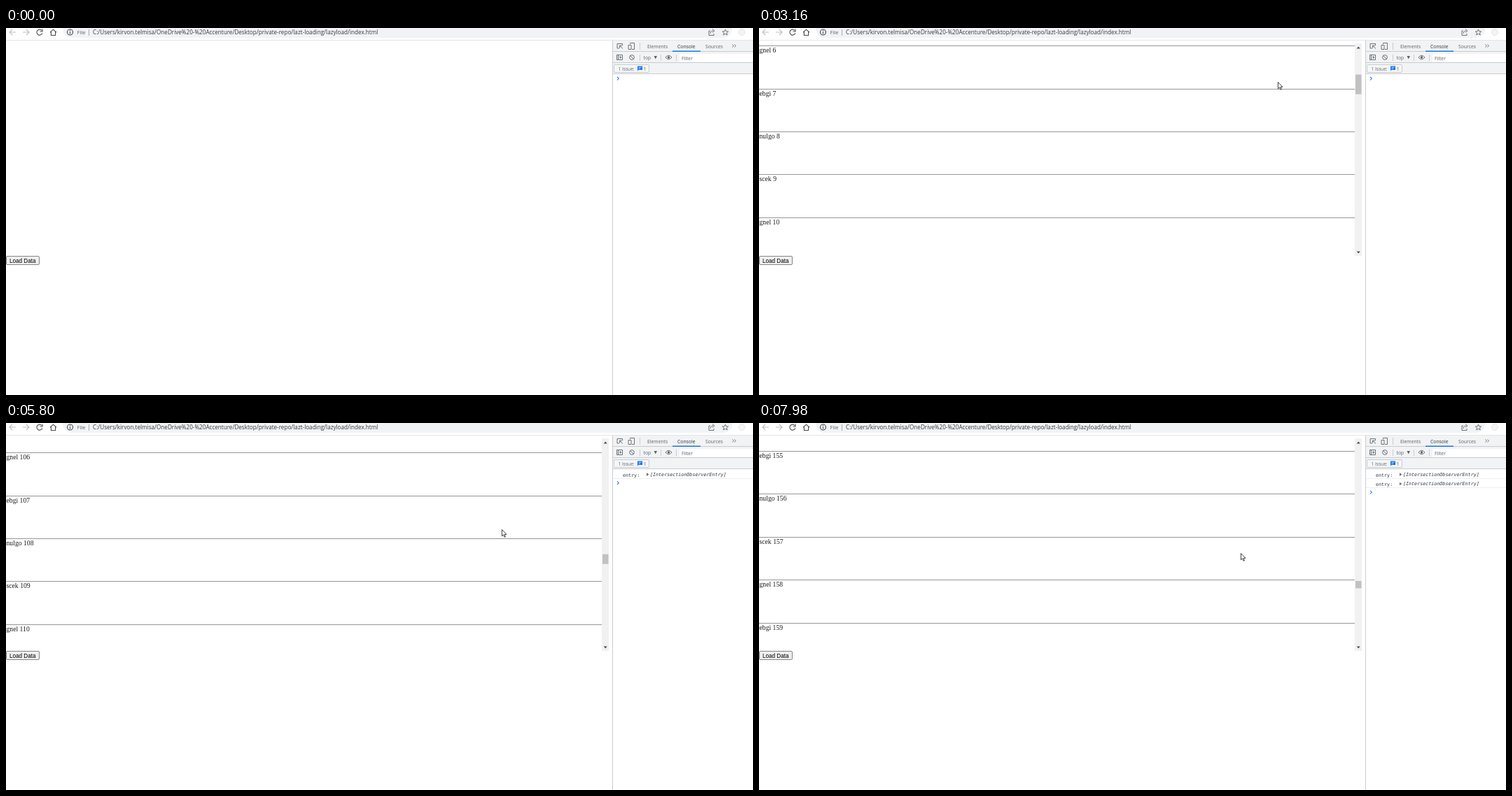
These frames come from a looping animation (1067 by 525 pixels, 8000 ms). An HTML page:

```html
<!DOCTYPE html>
<html lang="en">
<head>
<meta charset="utf-8">
<title>Lazy loading list</title>
<style>
  html, body { margin: 0; width: 100%; height: 100%; overflow: hidden; background: #fff; }
  svg { display: block; }
  text { white-space: pre; }
  .ui { font: 6.8px "Open Sans", "Noto Sans", sans-serif; fill: #5f6368; }
  .url { font-size: 8.15px; fill: #35383c; }
  .dark { fill: #303134; }
  .serif { font: 9.7px "Liberation Serif", serif; fill: #1c1c1c; }
  .mono { font: 6.7px "DejaVu Sans Mono", monospace; fill: #303942; }
  .italic { font-style: italic; }
  .icon { fill: none; stroke: #5f6368; stroke-width: .9; }
  .nav { stroke: #45494d; stroke-width: 1.1; }
  .off { stroke: #bcbfc2; }
  .rule { stroke: #cacdd1; shape-rendering: crispEdges; }
  .crisp { shape-rendering: crispEdges; }
</style>
</head>
<body>
<svg width="1067" height="525" viewBox="0 0 1067 525">
  <defs>
    <clipPath id="view"><rect y="22" width="851" height="304"/></clipPath>
  </defs>

  <!-- address bar -->
  <rect x="81" y="-13" width="956" height="27" rx="13" fill="#f1f3f4"/>
  <path class="rule" d="M0 17.5H1067" style="stroke:#e3e5e8"/>
  <path class="icon nav off" d="M14 6H5M9 2 5 6l4 4M24 6h9M29 2l4 4-4 4"/>
  <path class="icon nav" d="M51 3.5a4 4 0 1 0 .8 3.8M52 1.5V5h-3.5M63 6.2l4.5-4 4.5 4M64.4 5.5v5h6.2v-5"/>
  <circle class="icon nav" cx="91.5" cy="6" r="4"/>
  <path class="icon nav" d="M91.5 5.5v3M91.5 3.3v1.2"/>
  <text class="ui" x="101.5" y="9" style="font-size:7.6px">File</text>
  <path class="rule" d="M118.5 2v9" style="stroke:#a9acb0"/>
  <text class="ui url" x="124" y="9">C:/Users/kirvon.telmisa/OneDrive%20-%20Accenture/Desktop/private-repo/lazt-loading/lazyload/index.html</text>
  <path class="icon" d="M1006 4h-2v6.5h7V8M1006 8c.3-3 2-4 4-4M1009 1.5l3 2.5-3 2.5"/>
  <path class="icon" d="M1027.5 2l1.2 2.8 3 .2-2.3 2 .8 3-2.7-1.7-2.7 1.7.8-3-2.3-2 3-.2z"/>
  <circle cx="1051" cy="6" r="4.5" fill="#f3f4f5" stroke="#d9dbdd" stroke-width=".7"/>

  <!-- developer panel -->
  <rect x="867" y="18" width="200" height="48" fill="#f1f3f4"/>
  <path class="rule" d="M866.5 18V525M867 33.5H1067M867 49.5H1067M867 65.5H1067M905.5 21v10M905.5 38v9M935.5 38v9M957.5 38v9"/>
  <rect x="952" y="32.5" width="40" height="1.5" fill="#1a73e8"/>
  <path class="icon" d="M876 29h-3v-6.5h7.5V25M881 29.5l-4.5-4.2M876.5 28.5v-3.3h3.3"/>
  <path class="icon" d="M891.5 23v-1.5h6v9h-3.500M889 24.500h4v6h-4z"/>
  <text class="ui" x="916" y="28.5">Elements</text>
  <text class="ui dark" x="959" y="28.5">Console</text>
  <text class="ui" x="999" y="28.5">Sources</text>
  <path class="icon" d="M1037.5 23.5l2 2-2 2M1040.5 23.5l2 2-2 2"/>
  <path class="icon" d="M872.5 38.5h8v7h-8zM874.5 38.5v7M877 40.5l2 1.5-2 1.5z"/>
  <circle class="icon" cx="894" cy="42" r="3.4"/>
  <path class="icon" d="M891.6 39.6l4.8 4.8"/>
  <text class="ui" x="910.5" y="45">top</text>
  <path d="M925.5 40h4.5l-2.25 4.5z" fill="#5f6368"/>
  <path class="icon" d="M942 42q4.5-5.5 9 0-4.5 5.5-9 0z"/>
  <circle cx="946.5" cy="42" r="1.7" fill="#5f6368"/>
  <rect x="962" y="37" width="105" height="11.5" fill="#fff"/>
  <text class="ui" x="965" y="45.5">Filter</text>
  <rect x="868.5" y="52.5" width="50" height="11" rx="1.5" fill="#f5f6f7" stroke="#cacdd1"/>
  <text class="ui" x="874.5" y="60.5" style="font-size:6.6px">1 Issue:</text>
  <path d="M902 54.5h7v5.5h-5.5l-1.5 1.5z" fill="#1a73e8"/>
  <path d="M903.5 56.3h4M903.5 58.2h2.5" stroke="#fff" stroke-width=".7"/>
  <text class="ui" x="910.8" y="60.5">1</text>
  <g id="logs"></g>
  <path id="prompt" d="M873 70l2.3 2.3-2.3 2.3" fill="none" stroke="#367cf1" stroke-width="1.1"/>

  <!-- scrolling list -->
  <g id="list">
    <g id="rows" clip-path="url(#view)"></g>
    <rect class="crisp" x="851" y="22" width="10" height="304" fill="#f1f1f1"/>
    <path d="M853.7 29.5h5l-2.5-3zM853.7 319.5h5l-2.5 3z" fill="#454a5c"/>
    <rect id="thumb" x="852" width="8.5" fill="#c1c1c1"/>
  </g>

  <rect id="button" x=".5" y="326.5" width="47" height="12" rx="1.5" stroke="#858585"/>
  <text x="5" y="335.5" style="font:8.13px 'Liberation Sans',Arial,sans-serif">Load Data</text>

  <g id="cursor">
    <circle id="press" cx="0" cy="1" r="9.5" fill="#f4ea00" opacity=".65"/>
    <path d="M.4.5v9.3l2.1-2 1.5 3.5 1.5-.6-1.5-3.4h2.9z" fill="#fff" stroke="#111" stroke-width=".8"/>
  </g>
</svg>
<script>
const LOOP = 8000, STEP = 70;
const TOP = 22, VIEW = 304, PITCH = 61.36, BATCH = 50;
const TRACK_TOP = 33, TRACK = 283, MIN_THUMB = 10.4;
const NAMES = ["nulgo", "scek", "gnel", "ebgi"];

// [time, value, ...]
const scrollPath = [[2780, 0], [3140, 364.5], [4890, 2486.5], [5800, 3354.1], [6710, 4663.4], [7970, 6301.5]];
const cursorPath = [[380, 239, 422], [1020, 17, 332], [1690, 17, 332], [2450, 745, 72], [3140, 741, 77],
  [4890, 716, 142], [5800, 708, 152], [6710, 709, 170], [7970, 688, 186]];

const $ = id => document.getElementById(id);
const set = (node, attrs) => { for (const k in attrs) node.setAttribute(k, attrs[k]); };
const show = (node, on) => { node.style.display = on ? "" : "none"; };
const smooth = u => u * u * (3 - 2 * u);

function follow(path, t, ease = u => u) {
  const next = path.findIndex(p => p[0] > t);
  if (next < 0) return path[path.length - 1].slice(1);
  if (next === 0) return path[0].slice(1);
  const a = path[next - 1], b = path[next];
  const u = ease((t - a[0]) / (b[0] - a[0]));
  return a.slice(1).map((v, i) => v + (b[i + 1] - v) * u);
}

// Numbering jumps when a new batch is appended.
const label = i => i + [0, 51, 52][Math.floor(i / BATCH)];

$("rows").innerHTML = `<g><path class="crisp" d="M0 .5H851" stroke="#969696"/>
  <text class="serif" x=".5" y="9.5"></text></g>`.repeat(6);
const rows = [...$("rows").children];

$("logs").innerHTML = [0, 13.4].map(y => `<g transform="translate(0 ${y})">
  <text class="mono" x="881" y="76.5">entry:</text>
  <path d="M915 71.3v4.6l3.3-2.3z" fill="#6e6e6e"/>
  <text class="mono italic" x="920" y="76">[IntersectionObserverEntry]</text>
  <path class="crisp" d="M867 79.5H1067" stroke="#efefef"/></g>`).join("");
const logs = [...$("logs").children];

function drawList(scroll, count) {
  const first = Math.floor(scroll / PITCH);
  rows.forEach((row, k) => {
    const i = first + k, n = label(i);
    set(row, { transform: `translate(0 ${Math.floor(TOP + i * PITCH - scroll)})` });
    show(row.firstElementChild, i > 0);
    row.lastElementChild.textContent = `${NAMES[n % 4]} ${n}`;
  });
  const height = count * PITCH;
  const size = Math.max(MIN_THUMB, TRACK * VIEW / height);
  set($("thumb"), { y: TRACK_TOP + scroll / (height - VIEW) * (TRACK - size), height: size });
}

function draw(t) {
  const sampled = Math.floor((t + 10) / STEP) * STEP - 10;
  const [scroll] = follow(scrollPath, sampled);
  // Reaching the bottom logs an entry and loads another batch.
  const loads = [1, 2].filter(n => scroll > n * BATCH * PITCH - VIEW).length;

  show($("list"), t >= 1760);
  drawList(scroll, (loads + 1) * BATCH);
  logs.forEach((log, i) => show(log, i < loads));
  set($("prompt"), { transform: `translate(0 ${loads * 13.4})` });

  const pressed = t >= 1620 && t < 1760;
  const hover = t >= 960 && t < 1830;
  set($("button"), { fill: pressed ? "#f5f5f5" : hover ? "#e5e5e5" : "#efefef" });
  show($("press"), pressed);

  const [x, y] = follow(cursorPath, sampled, smooth);
  show($("cursor"), t >= 180);
  set($("cursor"), { transform: `translate(${Math.round(x)} ${Math.round(y)})` });
}

function frame() {
  draw(performance.now() % LOOP);
  requestAnimationFrame(frame);
}
frame();
</script>
</body>
</html>
```
